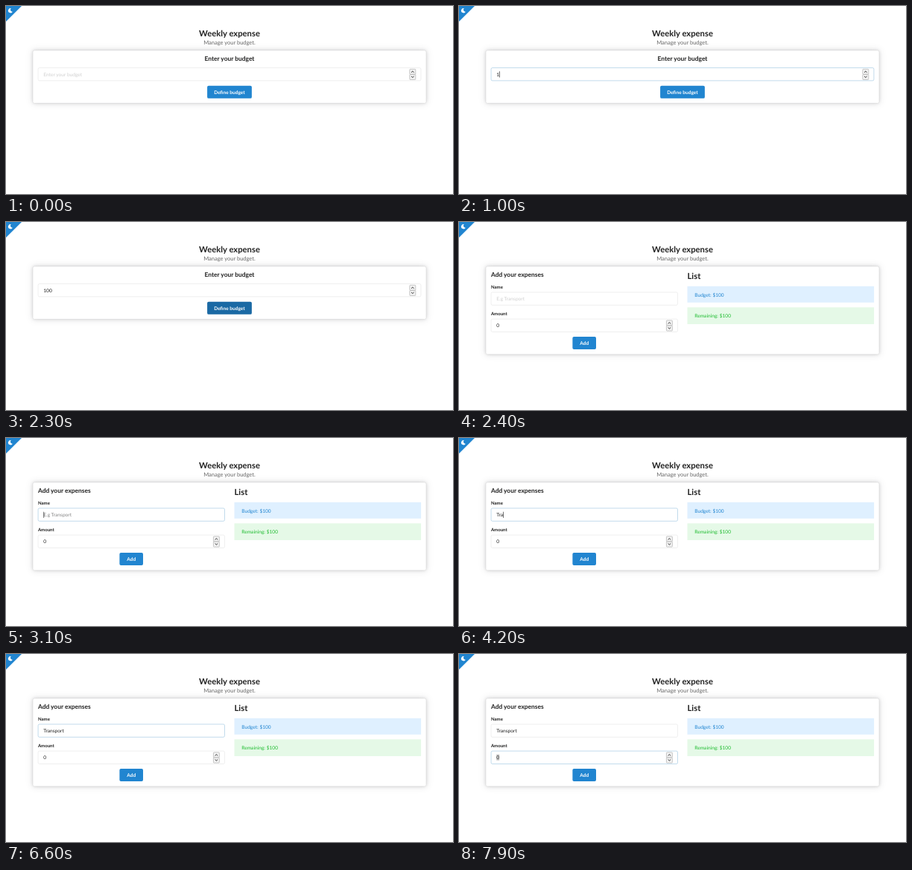
These frames come from a looping animation (600x254 px, 8000 ms). An HTML page:

```html
<!DOCTYPE html>
<html lang="en">
<head>
<meta charset="utf-8">
<title>Weekly expense</title>
<style>
  html, body { margin: 0; width: 100%; height: 100%; overflow: hidden; background: #fff; }
  svg { display: block; width: 100%; height: 100%; }
  text { font: 6.6px Lato, sans-serif; fill: rgba(0,0,0,.87); text-rendering: geometricPrecision; white-space: pre; }
  .mid { text-anchor: middle; }
  .h2 { font-size: 11.25px; font-weight: 700; }
  .h3 { font-size: 8.44px; font-weight: 700; }
  .sub { font-size: 7.5px; fill: rgba(0,0,0,.6); }
  .label { font-size: 6.09px; font-weight: 700; }
  .button text { font-size: 6.56px; font-weight: 700; fill: #fff; }
  .button rect, .corner { fill: #2185d0; }
  .card { fill: #fff; stroke: rgba(34,36,38,.15); stroke-width: .47;
    filter: drop-shadow(0 .94px 1.9px rgba(34,36,38,.12)) drop-shadow(0 .94px 4.7px rgba(34,36,38,.15)); }
  .box { fill: #fff; stroke: #dededf; stroke-width: .5; }
  .focus .box { stroke: #85b7d9; }
  .hint { fill: #d0d0d0; }
  .focus .hint { fill: #868686; }
  .selection { fill: rgba(100,100,100,.4); }
  .spinner rect { fill: #f1f1f1; stroke: #999; stroke-width: .5; }
  .spinner path { fill: none; stroke: #222; stroke-width: .9; }
</style>
</head>
<body>
<svg viewBox="0 0 600 254">
  <defs>
    <g id="spinner" class="spinner">
      <rect x="-8.3" y="2" width="8" height="7" rx=".9"/>
      <rect x="-8.3" y="9.2" width="8" height="7" rx=".9"/>
      <path d="M-6.1 6.5l1.8-1.7l1.8 1.7M-6.1 11.6l1.8 1.7l1.8-1.7"/>
    </g>
  </defs>

  <path class="corner" d="M0 0H21L0 21Z"/>
  <path fill="#fff" d="M6.8 3A3.2 3.2 0 1 0 8.9 7.7A2.7 2.7 0 0 1 6.8 3Z"/>
  <text class="mid h2" x="300" y="41.4">Weekly expense</text>
  <text class="mid sub" x="300" y="52">Manage your budget.</text>
  <rect id="card" class="card" x="36.1" y="60" width="527.8" height="71.3" rx="1.9"/>

  <g id="budgetPage">
    <text class="mid h3" x="300" y="74.1">Enter your budget</text>
    <g id="budget"></g>
    <g class="button">
      <rect id="define" x="270.1" y="107.8" width="59.8" height="17" rx="1.9"/>
      <text class="mid" x="300" y="118.8">Define budget</text>
    </g>
  </g>

  <g id="expensePage">
    <text class="h3" x="42.9" y="74.1">Add your expenses</text>
    <text class="label" x="42.9" y="89.9">Name</text>
    <g id="name"></g>
    <text class="label" x="42.9" y="126.2">Amount</text>
    <g id="amount"></g>
    <g class="button">
      <rect x="152.4" y="155" width="31.6" height="17" rx="1.9"/>
      <text class="mid" x="168.2" y="166">Add</text>
    </g>
    <text class="h2" x="306.5" y="76.6">List</text>
    <rect x="306.5" y="86.8" width="250.6" height="22" fill="#dff0ff"/>
    <text x="316.3" y="100.5" style="fill:#2185d0">Budget: $100</text>
    <rect x="306.5" y="115.3" width="250.6" height="22.7" fill="#e5f9e7"/>
    <text x="316.3" y="129.3" style="fill:#1ebc30">Remaining: $100</text>
  </g>
</svg>
<script>
const LOOP = 8000, TEXT_X = 50.3;
const el = id => document.getElementById(id);
const within = (t, from, to) => t >= from && t < to;

// Value of the last [time, value] step that has been reached.
const stepAt = (t, steps) => steps.filter(([time]) => time <= t).pop()[1];

function makeField(id, top, right, hint, hasSpinner) {
  const group = el(id);
  group.innerHTML = `
    <rect class="box" x="43.1" y="${top + .2}" width="${right - 43.3}" height="17.4" rx="1.8"/>
    <text class="hint" x="${TEXT_X}" y="${top + 11.3}">${hint}</text>
    <text class="value" x="${TEXT_X}" y="${top + 11.3}"></text>
    <rect class="selection" x="${TEXT_X}" y="${top + 4.8}" width="3.9" height="8"/>
    <rect class="caret" y="${top + 5}" width=".6" height="8.2" fill="#111"/>
    ${hasSpinner ? `<use href="#spinner" transform="translate(${right - 7} ${top})"/>` : ''}`;
  const part = name => group.querySelector('.' + name);
  const show = (name, on) => part(name).style.display = on ? '' : 'none';
  return (value, focus, caret, selected = false) => {
    const text = part('value');
    text.textContent = value;
    group.classList.toggle('focus', focus);
    show('hint', !value);
    show('selection', selected);
    show('caret', caret);
    if (caret) part('caret').setAttribute('x', TEXT_X + .2 + (value ? text.getComputedTextLength() : 0));
  };
}

const setBudget = makeField('budget', 83.3, 557.1, 'Enter your budget', true);
const setName = makeField('name', 94.7, 293.7, 'E.g Transport', false);
const setAmount = makeField('amount', 130.9, 293.7, '', true);

const budgetTyping = [[0, ''], [1000, '1'], [1300, '100']];
const nameKeyTimes = [3800, 4000, 4200, 4400, 4900, 5100, 5300, 5400, 5500];
const defineColors = [[0, '#2185d0'], [1900, '#1b7ec9'], [2000, '#1678c2'], [2300, '#1a69a4']];

function draw(t) {
  const onBudget = t < 2400;
  el('budgetPage').style.display = onBudget ? '' : 'none';
  el('expensePage').style.display = onBudget ? 'none' : '';
  el('card').setAttribute('height', onBudget ? 71.3 : 118.8);

  if (onBudget) {
    setBudget(stepAt(t, budgetTyping), within(t, 300, 2300), within(t, 300, 1500));
    el('define').style.fill = stepAt(t, defineColors);
  } else {
    const typed = nameKeyTimes.filter(time => time <= t).length;
    setName('Transport'.slice(0, typed), within(t, 3000, 6700), within(t, 3000, 6600));
    setAmount('0', t >= 6700, within(t, 6700, 7900), t >= 7900);
  }
}

function frame() {
  draw(performance.now() % LOOP);
  requestAnimationFrame(frame);
}
frame();
</script>
</body>
</html>
```
